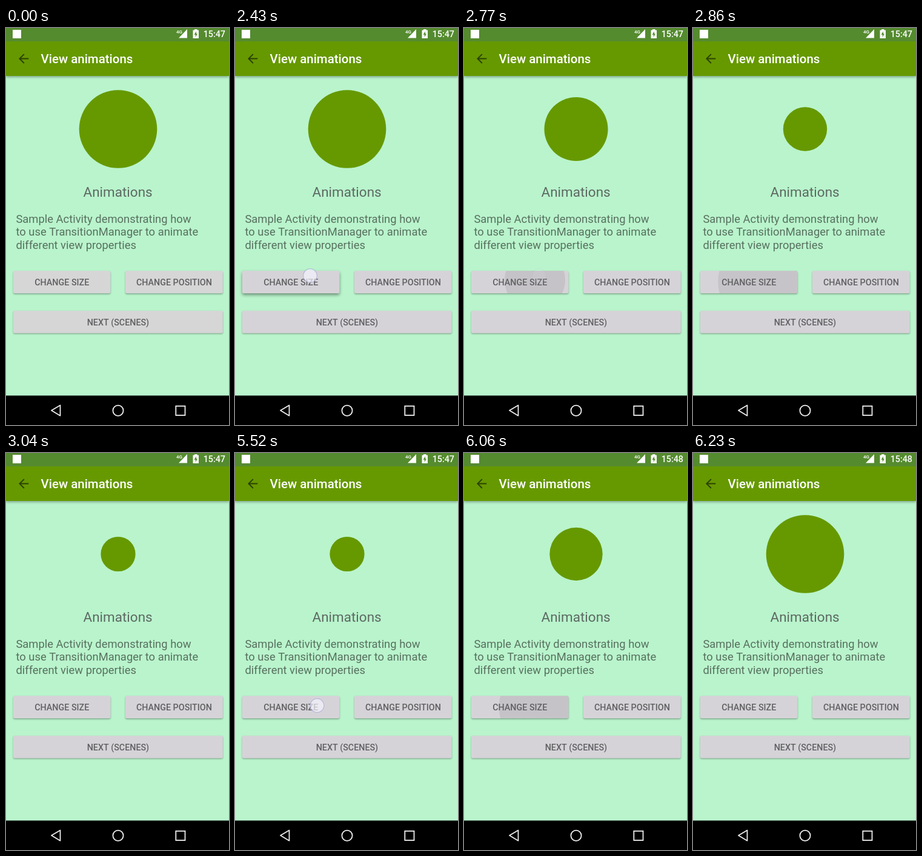
Animation of 368 by 654 pixels, one loop 8.55 s. Source, as an HTML page with a canvas:

```html
<!DOCTYPE html>
<html lang="en">
<head>
<meta charset="utf-8">
<title>View animations</title>
<style>
html, body { margin: 0; width: 100%; height: 100%; overflow: hidden; background: #b9f4cc; }
canvas { display: block; width: 368px; height: 654px; }
</style>
</head>
<body>
<canvas id="stage"></canvas>
<script>
const W = 368, H = 654, LOOP = 8550;
const stage = document.getElementById('stage');
const dpr = window.devicePixelRatio || 1;
stage.width = W * dpr;
stage.height = H * dpr;
const ctx = stage.getContext('2d');

// The screen refreshes only at these moments
const ticks = [0, 2430, 2520, 2600, 2690, 2770, 2860, 2950, 3040,
  5520, 5610, 5790, 5880, 5970, 6060, 6140, 6230];

const clamp = v => Math.max(0, Math.min(1, v));
const ramp = (t, from, to) => clamp((t - from) / (to - from));
const ease = x => 0.5 - Math.cos(Math.PI * x) / 2;
const mix = (a, b, k) => a + (b - a) * k;

const taps = [
  { x: 124, y: 408, down: 2430, lift: 2430, up: 2650, fade: 140,
    ripple: 2570, speed: 0.25, drift: 0.035, end: 3010 },
  { x: 135.5, y: 416, down: 5520, lift: 5610, up: 5900, fade: 120,
    ripple: 5790, speed: 0.26, drift: 0.028, end: 6220 }
];

function rect(x, y, w, h, color) {
  ctx.fillStyle = color;
  ctx.fillRect(x, y, w, h);
}

function disc(x, y, r, color) {
  ctx.beginPath();
  ctx.arc(x, y, r, 0, Math.PI * 2);
  ctx.fillStyle = color;
  ctx.fill();
}

function poly(points, color) {
  ctx.beginPath();
  points.forEach(([x, y]) => ctx.lineTo(x, y));
  ctx.closePath();
  ctx.fillStyle = color;
  ctx.fill();
}

function text(str, x, y, size, color, weight = 400, align = 'left') {
  ctx.font = `${weight} ${size}px Roboto, sans-serif`;
  ctx.textAlign = align;
  ctx.fillStyle = color;
  ctx.fillText(str, x, y);
}

function statusBar(t) {
  rect(0, 0, W, 22, '#558b2f');
  rect(11, 3, 14, 14, '#fff');
  text('4G', 281, 9, 8, '#fff', 500);
  poly([[299, 2], [299, 16.5], [285, 16.5]], '#fff');
  rect(311, 2, 4.5, 2, '#fff');
  rect(308.5, 3.5, 9.5, 13.5, '#fff');
  poly([[314, 5.5], [310.5, 11], [312.7, 11], [312.7, 15], [316, 9.5], [314, 9.5]], '#558b2f');
  text(t < 5790 ? '15:47' : '15:48', 362, 15, 14.3, '#fff', 500, 'right');
}

function toolbar() {
  ctx.save();
  ctx.shadowColor = 'rgba(0,0,0,.32)';
  ctx.shadowBlur = 4 * dpr;
  ctx.shadowOffsetY = 1.5 * dpr;
  rect(0, 22, W, 57, '#690');
  ctx.restore();
  ctx.save();
  ctx.translate(16.9, 38.3);
  ctx.scale(1.022, 1.022);
  poly([[20, 11], [7.83, 11], [13.42, 5.41], [12, 4], [4, 12], [12, 20],
    [13.41, 18.59], [7.83, 13], [20, 13]], 'rgba(0,0,0,.56)');
  ctx.restore();
  text('View animations', 57.5, 58.4, 20.44, '#fff', 500);
}

function navBar() {
  rect(0, 605.5, W, H - 605.5, '#000');
  ctx.strokeStyle = '#eee';
  ctx.lineWidth = 1.8;
  ctx.lineJoin = 'round';
  ctx.beginPath();
  ctx.moveTo(75, 630);
  ctx.lineTo(89.5, 621.5);
  ctx.lineTo(89.5, 638.7);
  ctx.closePath();
  ctx.stroke();
  ctx.beginPath();
  ctx.arc(185, 630.3, 8.6, 0, Math.PI * 2);
  ctx.stroke();
  ctx.lineJoin = 'miter';
  ctx.strokeRect(280.3, 622.8, 15.2, 15.2);
}

function ripple(tap, t) {
  if (t <= tap.ripple || t >= tap.end) return;
  const age = t - tap.ripple;
  const alpha = 0.08 * (1 - ramp(t, tap.end - 170, tap.end));
  disc(tap.x - age * tap.drift, mix(tap.y, 418.5, ramp(age, 0, 300)),
    age * tap.speed, `rgba(0,0,0,${alpha})`);
}

function button(label, x, y, w, h, color, lift = 0, t = -1) {
  ctx.save();
  ctx.beginPath();
  ctx.roundRect(x, y, w, h, 2);
  ctx.shadowColor = `rgba(0,0,0,${mix(0.32, 0.42, lift)})`;
  ctx.shadowBlur = mix(2.5, 5, lift) * dpr;
  ctx.shadowOffsetY = mix(1.4, 2.8, lift) * dpr;
  ctx.fillStyle = color;
  ctx.fill();
  ctx.shadowColor = 'transparent';
  ctx.clip();
  if (t >= 0) taps.forEach(tap => ripple(tap, t));
  ctx.restore();
  text(label, x + w / 2, y + h / 2 + 5.3, 14.3, '#606062', 500, 'center');
}

function touch(tap, t) {
  if (t < tap.down) return;
  const alpha = 1 - ramp(t, tap.up, tap.up + tap.fade);
  if (alpha <= 0) return;
  ctx.save();
  ctx.globalAlpha = alpha;
  disc(tap.x, tap.y, 11.3, 'rgba(244,243,252,.68)');
  ctx.strokeStyle = 'rgba(165,168,212,.65)';
  ctx.lineWidth = 1.2;
  ctx.stroke();
  ctx.restore();
}

function draw(t) {
  ctx.setTransform(dpr, 0, 0, dpr, 0, 0);
  rect(0, 0, W, H, '#b9f4cc');
  toolbar();
  statusBar(t);

  const shrink = ease(ramp(t, 2655, 2950)) - ease(ramp(t, 5925, 6225));
  disc(185, 166.5, mix(64.3, 28.6, shrink), '#690');

  text('Animations', 184.6, 278, 22.48, '#5d6963', 400, 'center');
  ['Sample Activity demonstrating how',
    'to use TransitionManager to animate',
    'different view properties'
  ].forEach((line, i) => text(line, 16.4, 320.6 + i * 21.5, 18.4, '#58705f'));

  const lift = Math.max(...taps.map(p =>
    t < p.lift ? 0 : 1 - ramp(t, p.up, p.up + 110)));
  const face = t < 2430 ? '#d6d6d7' : '#d6d3d8';
  button('CHANGE SIZE', 12, 400, 160.5, 37, face, lift, t);
  button('CHANGE POSITION', 197, 400, 160.8, 37, face);
  button('NEXT (SCENES)', 12, 465.7, 345.8, 37, face);
  taps.forEach(p => touch(p, t));
  navBar();
}

const start = performance.now();
function tick() {
  const now = (performance.now() - start) % LOOP;
  draw(ticks.filter(s => s <= now).pop() || 0);
  requestAnimationFrame(tick);
}
tick();
</script>
</body>
</html>
```
